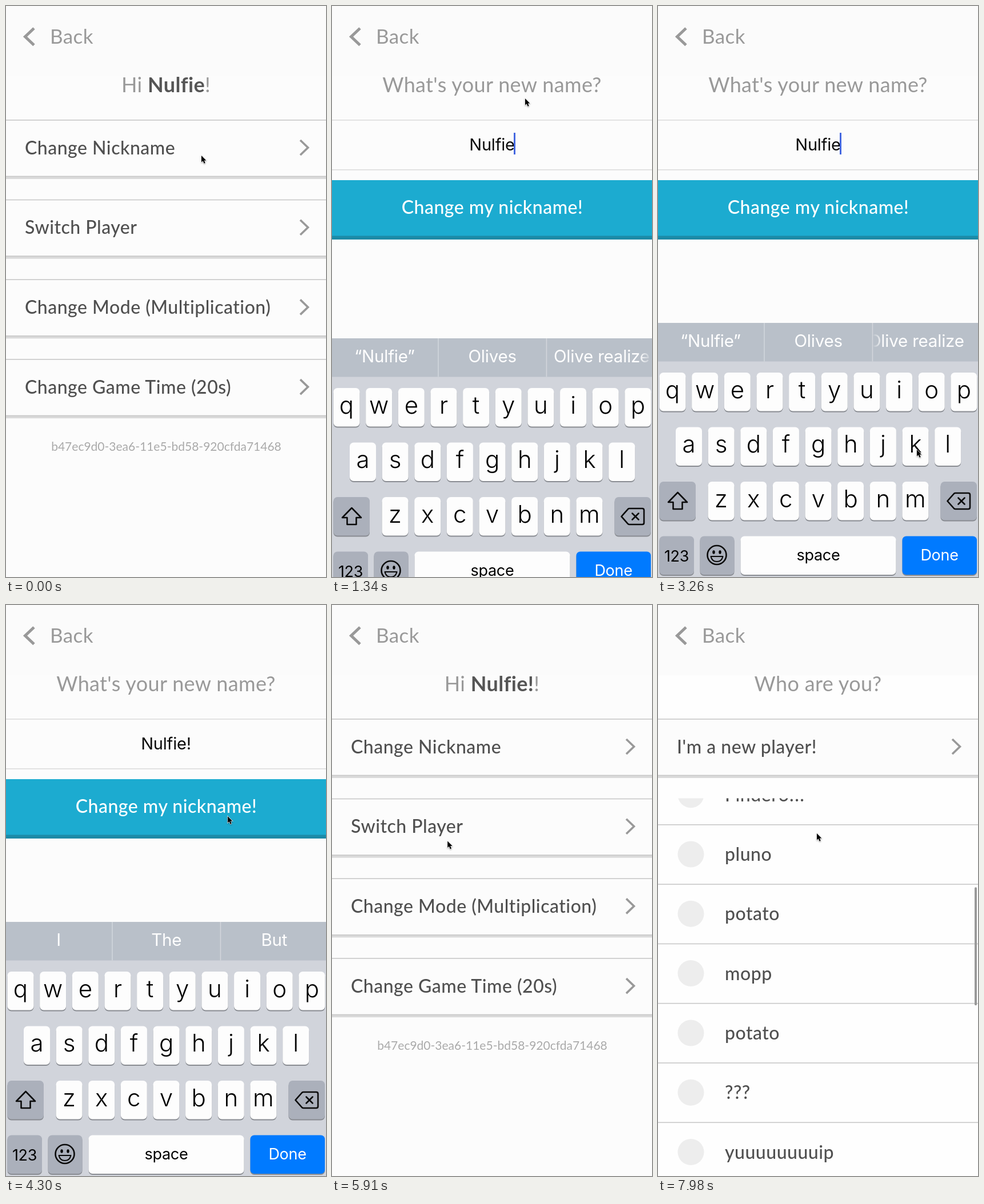
An HTML page that plays this animation: 560 by 1000 pixels, repeating every 8000 ms.

```html
<!DOCTYPE html>
<html lang="en">
<head>
<meta charset="utf-8">
<title>Change nickname</title>
<style>
  html, body { margin: 0; width: 100%; height: 100%; overflow: hidden; background: #fcfcfc; }
  svg { display: block; width: 560px; height: 1000px; }
  text { font-family: Lato, "Open Sans", sans-serif; }
  .title { font-size: 36px; letter-spacing: .35px; fill: #999; }
  .title tspan { font-weight: 700; fill: #555; }
  .back { font-size: 35px; letter-spacing: .4px; fill: #999; }
  .item { font-size: 32px; font-weight: 500; letter-spacing: .5px; fill: #505050; }
  .id { font-size: 21px; fill: #aaa; }
  .mid { text-anchor: middle; }
  .sys { font-family: Inter, Roboto, sans-serif; }
  .field { font-size: 29px; letter-spacing: -.2px; fill: #0a0a0a; }
  .hint { font-size: 29.5px; letter-spacing: -.2px; fill: #fff; }
  .key { font-size: 42px; font-weight: 350; }
  .label { font-size: 27px; letter-spacing: -.3px; }
  .icon { fill: none; stroke: #0a0a0a; stroke-width: 2.6; stroke-linejoin: round; stroke-linecap: round; }
  .chevron { fill: none; stroke: #999; stroke-width: 3.6; }
</style>
</head>
<body>
<svg viewBox="0 0 560 1000">
  <defs>
    <clipPath id="listClip"><rect y="338.5" width="560" height="662"/></clipPath>
    <clipPath id="hintClip"><rect x="376" y="555" width="184" height="68"/></clipPath>
    <linearGradient id="fade">
      <stop offset="0" stop-color="#b9c0c9"/>
      <stop offset="1" stop-color="#b9c0c9" stop-opacity="0"/>
    </linearGradient>
  </defs>
  <rect id="page" width="560" height="1000"/>
  <rect width="560" height="123" fill="#fbfbfb"/>
  <path class="chevron" d="M49 39L33.500 53.700L49 68.500" style="stroke-width:5"/>
  <text class="back" x="77" y="66">Back</text>
  <g id="menu"></g>
  <g id="form"></g>
  <g id="players"></g>
  <g id="keyboard"></g>
  <path id="pointer" d="M0 0V11.500L2.700 9.200L4.600 13.800L6.700 12.900L4.800 8.500H8.400Z"
    stroke="#fff" stroke-width="1.200" paint-order="stroke"
    style="filter: drop-shadow(0 1px 1px rgba(0,0,0,.35))"/>
</svg>
<script>
const LOOP = 8000;
const TICK = 147.7;   // the screen refreshes once per tick
const NAME = 'Nulfie';
const TEAL = '#1cabd0', GREY = '#abb0bb', WHITE = '#fdfdfd';
const $ = id => document.getElementById(id);

// ---- markup helpers ----
const text = (cls, x, y, s, extra = '') => `<text class="${cls}" x="${x}" y="${y}" ${extra}>${s}</text>`;
const rect = (x, y, w, h, fill, extra = '') =>
  `<rect x="${x}" y="${y}" width="${w}" height="${h}" fill="${fill}" ${extra}/>`;
const rule = (y, color = '#c8c8c8') => rect(0, y, 560, 1.6, color);

const card = (y, label) =>
  rect(0, y, 560, 103, '#fcfcfc') + rule(y) +
  rect(0, y + 99, 560, 5, '#dadada') + rule(y + 98.6) +
  `<path class="chevron" d="M515 ${y + 36}l13.500 13l-13.500 13"/>` +
  text('item', 33, y + 60.5, label);

// ---- screens ----
const items = ['Change Nickname', 'Switch Player', 'Change Mode (Multiplication)', 'Change Game Time (20s)'];
$('menu').innerHTML =
  text('title mid', 280, 151, `Hi <tspan id="greet">${NAME}</tspan>!`) +
  items.map((s, i) => card(199 + i * 139.7, s)).join('') +
  text('id mid', 280.5, 779, 'b47ec9d0-3ea6-11e5-bd58-920cfda71468');

$('form').innerHTML =
  text('title mid', 280, 151, "What's your new name?") +
  rule(199, '#dcdcdc') + rule(286, '#dcdcdc') +
  text('sys field mid', 280, 252.5, NAME, 'id="field"') +
  rect(318, 222, 3, 38, '#4468e0', 'id="caret"') +
  rect(0, 305, 560, 104, TEAL) + rect(0, 402.5, 560, 6.5, '#1c8aa7') +
  text('item mid', 280.5, 364, 'Change my nickname!', 'style="fill:#fff"');

const names = [NAME + '!', 'dob!', 'test', 'test?', 'Finder6!!!', 'pluno', 'potato', 'mopp',
  'potato', '???', 'yuuuuuuuuip'];
const player = (s, i) => {
  const y = 339 + i * 104.3;
  return rule(y) +
    `<circle cx="57.5" cy="${y + 52.5}" r="23" fill="${i ? '#ededed' : TEAL}"/>` +
    (i ? '' : '<path d="M47.500 392l7 7l13-13" fill="none" stroke="#fff" stroke-width="5"/>') +
    text('item', 117, y + 64, s);
};
$('players').innerHTML =
  text('title mid', 280, 151, 'Who are you?') + card(199, "I'm a new player!") +
  `<g clip-path="url(#listClip)"><g id="list">${names.map(player).join('')}</g></g>` +
  rect(554, 345, 4, 207, '#999', 'rx="2" id="thumb"');

// ---- keyboard ----
const rowY = r => 642 + r * 95.5;
const key = (x, r, w, fill, inner) =>
  rect(x, rowY(r) + 2, w, 67.5, '#898c92', 'rx="7"') + rect(x, rowY(r), w, 67.5, fill, 'rx="7"') + inner;
const letters = (chars, x0, r) => [...chars].map((c, i) => {
  const x = x0 + i * 56.65;
  return key(x, r, 46, WHITE, text('sys key mid', x + 23, rowY(r) + 44.5, c));
}).join('');
const third = i => 92 + i * 188.7;
const hint = (i, s) => text('sys hint mid', third(i), 597, s);

const shiftIcon = '<path class="icon" d="M34.500 852L51 869H42.500V881H26.500V869H18Z"/>';
const deleteIcon = `<path class="icon" d="M506.500 867L518 854Q519 853 520.500 853H543Q546 853 546 856V878
  Q546 881 543 881H520.500Q519 881 518 880ZM525.500 861.500l11 11m0-11l-11 11"/>`;
const smiley = `<circle class="icon" cx="103" cy="961.5" r="16.500"/>
  <ellipse cx="97.500" cy="956.500" rx="2.200" ry="3.300"/><ellipse cx="108.500" cy="956.500" rx="2.200" ry="3.300"/>
  <path class="icon" d="M92.500 964H113.500Q111.500 973 103 973T92.500 964Z" style="stroke-width:2"/>`;

$('keyboard').innerHTML =
  rect(0, 555, 560, 500, '#d1d4db') + rect(0, 555, 560, 67.5, '#b9c0c9') +
  `<g id="before">${hint(0, `“${NAME}”`)}${hint(1, 'Olives')}
    <g clip-path="url(#hintClip)">
      ${text('sys hint', 388, 597, 'Olive realize', 'id="long"')}
      ${rect(376, 556, 18, 66, 'url(#fade)', 'id="fadeL"')}
      ${rect(-560, 556, 22, 66, 'url(#fade)', 'id="fadeR" transform="scale(-1 1)"')}
    </g>
  </g>
  <g id="after">${hint(0, 'I')}${hint(1, 'The')}${hint(2, 'But')}</g>` +
  rect(185.2, 555, 1.5, 67.5, '#d3d7dd') + rect(374.7, 555, 1.5, 67.5, '#d3d7dd') +
  letters('qwertyuiop', 2.5, 0) + letters('asdfghjkl', 31, 1) + letters('zxcvbnm', 87.5, 2) +
  key(2.5, 2, 63.5, GREY, shiftIcon) +
  key(494.5, 2, 63.5, GREY, deleteIcon) +
  key(2.5, 3, 60.5, GREY, text('sys label mid', 32.5, 973, '123')) +
  key(73.5, 3, 60, GREY, smiley) +
  key(144.5, 3, 272, WHITE, text('sys label mid', 280.5, 971, 'space')) +
  key(427.5, 3, 130.5, '#007aff', text('sys label mid', 492.5, 971, 'Done', 'fill="#fff"'));

// ---- motion, all times in ticks ----
const OPEN = 7, TYPED = 23, SAVED = 31, SWITCH = 43, DRAG = 48;

const clamp = v => Math.min(1, Math.max(0, v));
const smooth = u => (u = clamp(u)) * u * (3 - 2 * u);
const settle = u => 1 - (1 - clamp(u)) ** 2.55;

// places where the pointer rests or turns: [tick, x, y]
const stops = [
  [0, 342, 262], [2, 331, 271], [OPEN - 1, 331, 271], [9, 338, 162], [12, 368, 233], [17, 368, 233],
  [22, 453, 777], [25, 453, 777], [29, 388, 370], [32, 388, 371], [38, 203, 421], [41, 202, 411],
  [44, 202, 411], [DRAG, 193, 783], [54, 278, 400]
];
function pointerAt(k) {
  const i = Math.max(1, stops.findIndex(s => s[0] >= k));
  const [t0, x0, y0] = stops[i - 1], [t1, x1, y1] = stops[i];
  const u = smooth((k - t0) / (t1 - t0));
  return [x0 + (x1 - x0) * u, y0 + (y1 - y0) * u];
}

const show = (id, on) => $(id).setAttribute('visibility', on ? 'inherit' : 'hidden');
const move = (id, x, y) => $(id).setAttribute('transform', `translate(${x} ${y})`);

function draw(t) {
  const k = Math.floor(t / TICK);
  const screen = k >= SWITCH ? 'players' : k >= OPEN && k < SAVED ? 'form' : 'menu';
  for (const id of ['menu', 'form', 'players']) show(id, screen === id);
  $('page').setAttribute('fill', screen === 'players' ? '#fefefe' : '#fcfcfc');

  const typed = k >= TYPED;
  $('greet').textContent = $('field').textContent = NAME + (typed ? '!' : '');
  $('caret').setAttribute('x', typed ? 323 : 318);
  const phase = (k - (typed ? 24 : 14)) / 7;
  $('caret').setAttribute('opacity', clamp(.5 + 1.2 * Math.sin(phase * 2 * Math.PI)));
  show('before', !typed);
  show('after', typed);

  const slid = smooth((k - 9) / 3);
  move('long', -20 * slid, 0);
  show('fadeL', !typed && slid > 0);
  show('fadeR', !typed && slid < 1);
  move('keyboard', 0, 445 * (1 - settle((k - OPEN) / 3) + settle((k - SAVED + .62) / 3)));

  const y = 476.5 * smooth((k - DRAG) / 6);
  move('list', 0, -y);
  move('thumb', 0, y * .313);
  show('thumb', y > 0);
  move('pointer', ...pointerAt(k));
}

const start = performance.now();
function frame(now) {
  draw(Math.max(0, now - start) % LOOP);
  requestAnimationFrame(frame);
}
draw(0);
requestAnimationFrame(frame);
</script>
</body>
</html>
```
